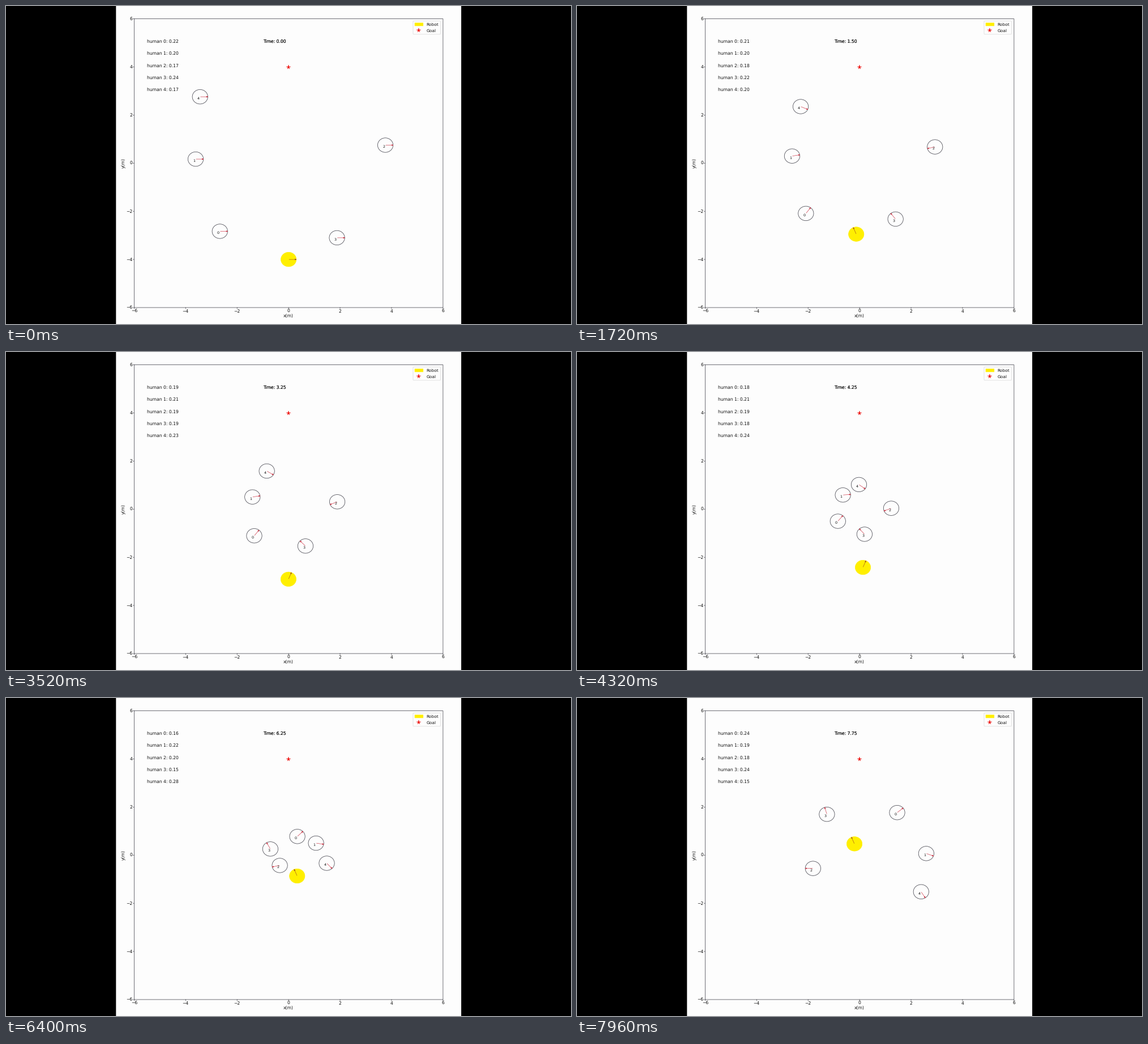
Animation, 998 px wide and 561 px high, one loop 8 s. Source, as a matplotlib script:

```python
import numpy as np
import matplotlib.pyplot as plt
from matplotlib.animation import FuncAnimation
from matplotlib.patches import Ellipse, FancyBboxPatch, Rectangle

W, H, DPI = 998, 561, 100
FRAME_MS, FRAMES = 40, 200
STEP, STEP_MS = 0.25, 252        # simulated seconds, screen time per update
RADIUS = 0.3
PAPER, YELLOW, RED, INK = "#fdfdfd", "#ffef00", "#ee1512", "#111111"
LINE, ARROW, ROBOT_ARROW = "#4c4c55", "#cc3344", "#a8541c"

# Each human follows a smooth curve through four points (metres);
# its attention share drifts to a turning value and then to a final one.
PATH_TIMES = [0, 2.5, 5.25, 7.75]
SHARE_TIMES = [0, 6.25, 7.75]
HUMANS = [
    ([(-2.67, -2.83), (-1.67, -1.54), (-0.29, 0.13), (1.46, 1.77)], (0.22, 0.16, 0.24)),
    ([(-3.61, 0.17), (-1.94, 0.42), (0.17, 0.60), (2.59, 0.07)], (0.20, 0.22, 0.19)),
    ([(3.76, 0.75), (2.35, 0.49), (0.49, -0.22), (-1.81, -0.55)], (0.17, 0.20, 0.18)),
    ([(1.88, -3.10), (0.99, -1.87), (-0.27, -0.46), (-1.27, 1.70)], (0.24, 0.15, 0.24)),
    ([(-3.44, 2.76), (-1.47, 1.95), (0.76, 0.38), (2.39, -1.52)], (0.17, 0.28, 0.15)),
]
CURVES = [np.polyfit(PATH_TIMES, path, 3) for path, _ in HUMANS]

# The robot drives straight legs: (time, x, y) at each turn.
LEGS = np.array([(0, 0, -4), (1, 0, -3.26), (1.5, -0.13, -2.95),
                 (2.25, -0.14, -3.4), (4.25, 0.13, -2.42),
                 (5.75, 0.51, -1.31), (7.75, -0.2, 0.47)])


def human_at(i, t):
    return np.array([t ** 3, t ** 2, t, 1]) @ CURVES[i]


def robot_at(t):
    return np.array([np.interp(t, LEGS[:, 0], LEGS[:, k]) for k in (1, 2)])


def heading(position, t):
    """Direction of the last step; everyone faces right at the start."""
    if t == 0:
        return 0.0
    dx, dy = position(t) - position(t - STEP)
    return np.arctan2(dy, dx)


def px(x):
    return 499.15 + 45.46 * x


def py(y):
    return 277.3 - 42.45 * y


plt.rcParams.update({"font.family": "DejaVu Sans", "text.hinting": "none"})
fig = plt.figure(figsize=(W / DPI, H / DPI), dpi=DPI, facecolor="black")
ax = fig.add_axes([0, 0, 1, 1])
ax.set_xlim(0, W)
ax.set_ylim(H, 0)
ax.axis("off")


def points(pixels):
    return pixels * 72 / DPI


def label(x, y, text, size=7.6, **style):
    return ax.text(x, y, text, fontsize=points(size), color=INK, **style)


def line(xs, ys, color=LINE, width=0.8, **style):
    return ax.plot(xs, ys, color=color, lw=points(width), snap=False,
                   solid_joinstyle="miter", **style)[0]


def box(x, y, w, h, color):
    ax.add_patch(Rectangle((x, y), w, h, color=color, lw=0, snap=False))


def star(x, y):
    ax.plot(x, y, "*", color=RED, ms=points(7.6), mew=0.3, snap=False)


def disc(**style):
    return ax.add_patch(Ellipse((0, 0), px(2 * RADIUS) - px(0),
                                py(0) - py(2 * RADIUS), **style))


def arrow(color):
    return line([], [], color, 0.65, zorder=5)


def aim(artist, center, angle):
    """Draw an arrow from the centre to the rim, in screen pixels."""
    start = np.array([px(center[0]), py(center[1])])
    rim = center + RADIUS * np.array([np.cos(angle), np.sin(angle)])
    tip = np.array([px(rim[0]), py(rim[1])])
    along = (tip - start) / np.hypot(*(tip - start))
    side = np.array([-along[1], along[0]])
    back = tip - 2.2 * along
    path = np.array([start + along, tip, back + side, back - side, tip])
    artist.set_data(path[:, 0], path[:, 1])


def draw_plot():
    box(194.3, 0, 609.8, H, PAPER)
    left, right, top, bottom = px(-6), px(6), py(6), py(-6)
    line([left, right, right, left, left], [top, top, bottom, bottom, top])
    for v in range(-6, 7, 2):
        text = str(v).replace("-", "\u2212")
        line([px(v)] * 2, [bottom, bottom + 1.8])
        line([left - 1.8, left], [py(v)] * 2)
        label(px(v), 540.8, text, ha="center")
        label(223.3, py(v) + 2.9, text, ha="right")
    label(499, 549.2, "x(m)", ha="center")
    label(206.6, 277.5, "y(m)", rotation=90, ha="center", va="center")
    star(px(0), py(4))
    ax.add_patch(FancyBboxPatch((720, 27.3), 46.6, 21.6,
                                boxstyle="round,pad=1,rounding_size=1.5",
                                fc=PAPER, ec="#dcdcdc", lw=points(0.8)))
    box(721.8, 29.5, 15.3, 5.8, YELLOW)
    star(729.5, 42.8)
    label(742.6, 35.4, "Robot", 7.5)
    label(742.6, 45.9, "Goal", 7.5)


draw_plot()
robot = disc(color=YELLOW, lw=points(0.6), zorder=3)
robot_arrow = arrow(ROBOT_ARROW)
bodies, names, arrows, shares = [], [], [], []
for i in range(len(HUMANS)):
    bodies.append(disc(fill=False, ec=LINE, lw=points(0.8), zorder=4))
    names.append(label(0, 0, str(i), 6.4, zorder=6))
    arrows.append(arrow(ARROW))
    shares.append(label(px(-5.5), py(5 - 0.5 * i), ""))
# The clock is printed twice, which makes it look a little heavier.
clocks = [label(px(-1), py(5), "") for _ in range(2)]


def update(frame):
    t = frame * FRAME_MS // STEP_MS * STEP
    for clock in clocks:
        clock.set_text(f"Time: {t:.2f}")

    center = robot_at(t)
    robot.center = px(center[0]), py(center[1])
    turn = np.pi / 8             # the robot steers in sixteenths of a circle
    aim(robot_arrow, center, round(heading(robot_at, t) / turn) * turn)

    for i, (_, share) in enumerate(HUMANS):
        center = human_at(i, t)
        x, y = px(center[0]), py(center[1])
        bodies[i].center = x, y
        names[i].set_position((x - 4.9, y + 4.9))
        aim(arrows[i], center, heading(lambda s: human_at(i, s), t))
        value = np.interp(t, SHARE_TIMES, share)
        shares[i].set_text(f"human {i}: {value:.2f}")
    return [robot, robot_arrow, *bodies, *names, *arrows, *shares, *clocks]


anim = FuncAnimation(fig, update, frames=FRAMES, interval=FRAME_MS,
                     repeat=True, repeat_delay=0, blit=False)
plt.show()
```
